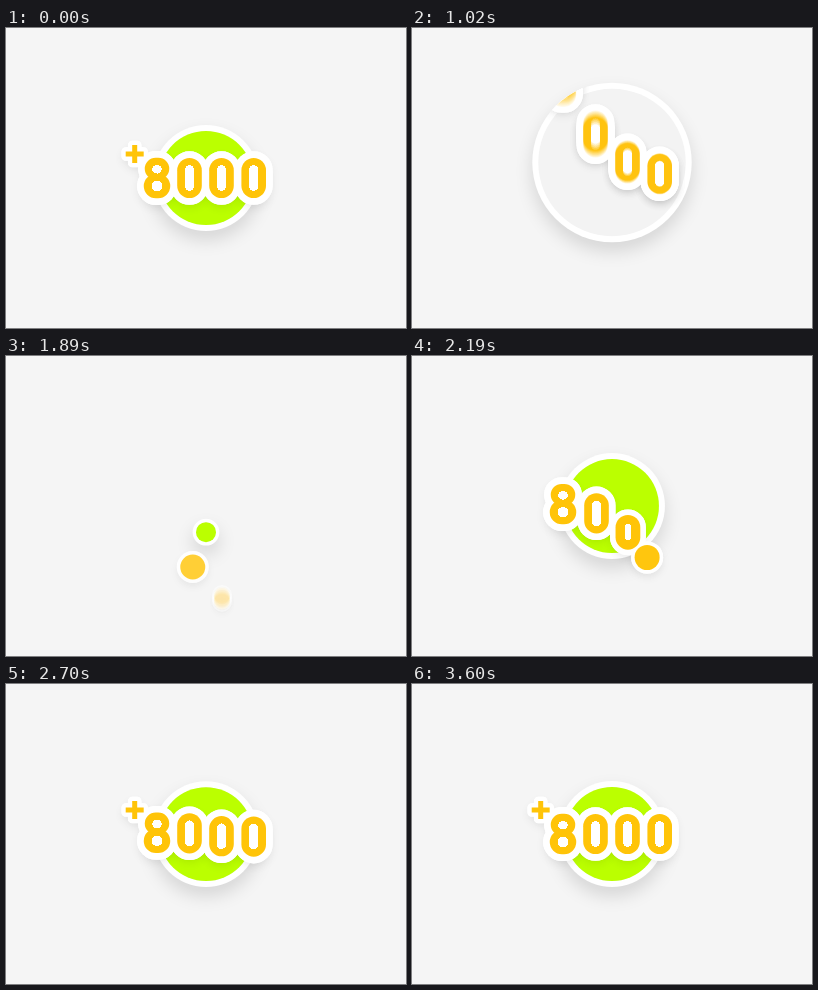
Write an HTML page with a canvas that moves like this. It is 400 px wide and 300 px high and loops after 3630 ms.

```html
<!DOCTYPE html>
<html lang="en">
<head>
<meta charset="utf-8">
<style>
  html, body { margin: 0; width: 100%; height: 100%; overflow: hidden; background: #f5f5f5; }
  canvas { display: block; }
</style>
</head>
<body>
<canvas id="stage" width="400" height="300"></canvas>
<script>
const ctx = document.getElementById('stage').getContext('2d');
const ink = new OffscreenCanvas(400, 300).getContext('2d');
const LOOP = 3630, YELLOW = '#ffc408', GREEN = '#bbff00';
const DIGIT_X = [151, 183.5, 215.5, 247.7];

const clamp = v => Math.max(0, Math.min(1, v));
const span = (t, from, to) => clamp((t - from) / (to - from));
const mix = (a, b, p) => a + (b - a) * p;
const smooth = p => p * p * (3 - 2 * p);
const wobble = (s, half, decay) => s > 0 ? Math.exp(-((s / decay) ** 2)) * Math.sin(Math.PI * s / half) : 0;
const lift = age => (Math.max(0, age) * 0.0095) ** 4;

function discAt(t) {
  if (t < 1300) {
    const grow = 1 - (1 - span(t, 570, 740)) ** 3;
    const shrink = span(t, 1020, 1290);
    return {
      y: 150 - 15.2 * span(t, 570, 1020) ** 2 - 85 * shrink,
      r: mix(53, 80.2, grow) * (1 - shrink) ** 1.6,
      green: 1 - span(t, 570, 670)
    };
  }
  const p = smooth(span(t, 1740, 2200));
  const bounce = wobble(t - 2200, 440, 450);
  return { y: 150 + 35 * (1 - p) - 0.8 * bounce, r: 53 * p + 0.8 * bounce, green: 1 };
}

function digitAt(i, t) {
  const digit = { kind: i ? 'zero' : 'eight', x: DIGIT_X[i], y: 150, scale: 1, alpha: 1, morph: 1, smear: 0 };
  if (t < 1300) {
    const age = t - 690 - 60 * i;
    digit.y -= lift(age);
    digit.smear = 12 * (lift(age) - lift(age - 1));
    return digit;
  }
  const age = t - 1790 - 90 * i;
  if (age < 0) return null;
  const left = 1 - clamp(age / 375);
  digit.x = mix(digit.x, 218, left ** 2);
  digit.y += 96.5 * left ** 1.46 - 5 * wobble(age - 375, 210, 450);
  digit.scale = Math.min(1, 0.58 + age / 200);
  digit.alpha = Math.min(1, 0.25 + age / 180);
  digit.morph = smooth(span(age, 120, 290));
  digit.smear = 9 * (1 - span(age, 0, 100));
  return digit;
}

function plusAt(t) {
  const plus = { kind: 'plus', x: 128.7, y: 126, scale: 1, alpha: 1, morph: 1, smear: 0 };
  if (t < 1300) {
    plus.y -= lift(t - 630);
    return plus;
  }
  if (t < 2240) return null;
  const left = (1 - span(t, 2250, 2420)) ** 2;
  plus.x -= 63 * left;
  plus.y -= 54 * left;
  return plus;
}

function pill(path, y, w, h) {
  path.roundRect(-w / 2, y, w, h, Math.min(w, h) / 2);
}

// Outer contour and counters; a morph of 0 closes every glyph into a ball.
function shapeOf({ kind, morph: m }) {
  const outer = new Path2D(), holes = new Path2D();
  holes.rect(-50, -50, 100, 100);
  if (kind === 'plus') {
    outer.rect(-9, -2.5, 18, 5);
    outer.rect(-2.5, -9, 5, 18);
  } else if (kind === 'zero') {
    const h = 25 + 15.2 * m;
    pill(outer, -h / 2, 25 - 0.4 * m, h);
    pill(holes, -12.8 * m, 9.3 * m, 25.6 * m);
  } else {
    const h = 25 + 15.4 * m, low = h * (1 - 0.4 * m);
    pill(outer, -h / 2, 25 - 0.5 * m, h * (1 - 0.46 * m));
    pill(outer, h / 2 - low, 25 + 1.5 * m, low);
    pill(holes, -13 * m, 9.5 * m, 8.5 * m);
    pill(holes, 3 * m, 11 * m, 10 * m);
  }
  return { outer, holes };
}

function at(c, part, dy, alpha, draw) {
  c.save();
  c.translate(part.x, part.y + dy);
  c.scale(part.scale, part.scale);
  c.globalAlpha = part.alpha * alpha;
  draw(shapeOf(part));
  c.restore();
}

function halo(part) {
  for (const k of part.smear > 1 ? [-0.4, 0, 0.4] : [0]) {
    at(ctx, part, k * part.smear, 1, ({ outer }) => {
      ctx.fillStyle = ctx.strokeStyle = '#fff';
      ctx.lineJoin = 'round';
      ctx.lineWidth = part.kind === 'plus' ? 8.5 : 7 + 6.4 * part.morph;
      ctx.stroke(outer);
      ctx.fill(outer);
    });
  }
}

// Sums faint copies along the path for motion blur.
function face(part) {
  const copies = part.smear > 1 ? 12 : 1;
  for (let k = 0; k < copies; k++) {
    const dy = ((k + 0.5) / copies - 0.5) * part.smear;
    at(ink, part, dy, 1 / copies, ({ outer, holes }) => {
      ink.clip(holes, 'evenodd');
      ink.fillStyle = YELLOW;
      ink.fill(outer);
    });
  }
}

function withShadow(opacity, offset, blur, draw) {
  ctx.save();
  ctx.shadowColor = `rgba(0,0,0,${opacity})`;
  ctx.shadowOffsetY = offset;
  ctx.shadowBlur = blur;
  draw();
  ctx.restore();
}

function circle(y, r, color, alpha = 1) {
  ctx.globalAlpha = alpha;
  ctx.fillStyle = color;
  ctx.beginPath();
  ctx.arc(200, y, Math.max(0, r), 0, 2 * Math.PI);
  ctx.fill();
  ctx.globalAlpha = 1;
}

function render(t) {
  ctx.fillStyle = '#f5f5f5';
  ctx.fillRect(0, 0, 400, 300);
  if (t >= 1290 && t < 1740) return;

  const disc = discAt(t);
  const inner = disc.r - Math.min(6, 2.5 + 3.5 * disc.r / 53);
  if (disc.r > 0.2) {
    withShadow(0.13, 9, 18, () => circle(disc.y, disc.r, '#fff'));
    circle(disc.y, inner, '#f3f3f3');
    circle(disc.y, inner, GREEN, disc.green);
  }

  ctx.save();
  if (t > 690 && t < 1300) {
    ctx.beginPath();
    ctx.arc(200, disc.y, disc.r, 0, 2 * Math.PI);
    if (t < 1000) ctx.rect(0, disc.y - 42, 400, 300);
    ctx.clip();
  }
  const parts = [plusAt(t), ...DIGIT_X.map((_, i) => digitAt(i, t))].filter(Boolean);
  withShadow(0.06, 4, 9, () => parts.forEach(halo));
  parts.forEach(halo);
  ink.clearRect(0, 0, 400, 300);
  ink.globalCompositeOperation = 'lighter';
  parts.forEach(face);
  ctx.drawImage(ink.canvas, 0, 0);
  ctx.restore();
}

const start = performance.now();
function tick() {
  render((performance.now() - start) % LOOP);
  requestAnimationFrame(tick);
}
tick();
</script>
</body>
</html>
```
